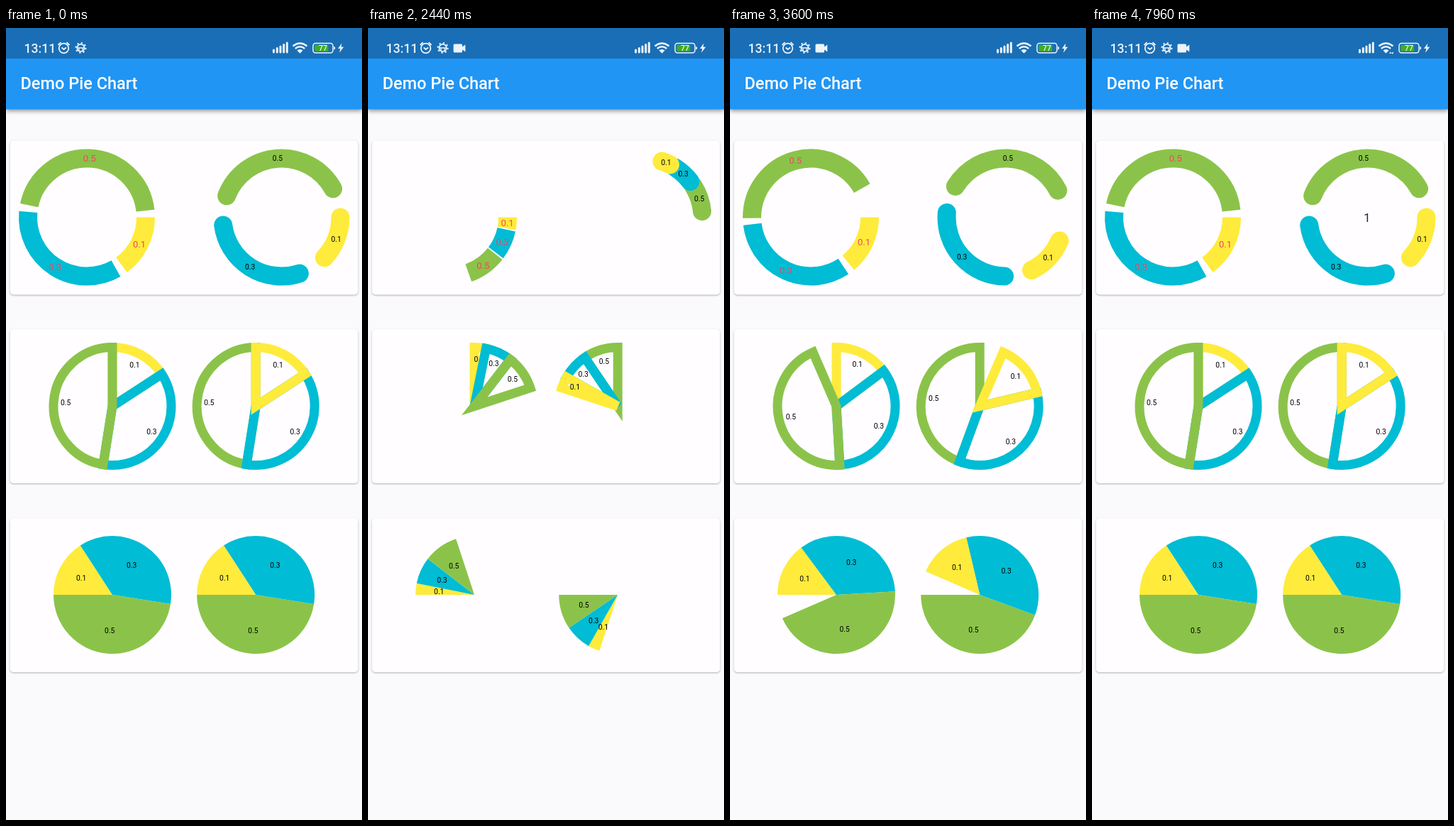
These frames come from a looping animation (502x1115 px, 8000 ms). An HTML page:

```html
<!DOCTYPE html>
<html lang="en">
<head>
<meta charset="utf-8">
<title>Demo Pie Chart</title>
<style>
  html, body { margin: 0; width: 100%; height: 100%; overflow: hidden; background: #faf9fc; }
  svg { display: block; width: 502px; height: 1115px; }
  text { font-family: Roboto, sans-serif; }
  .card { fill: #fffdff; filter: drop-shadow(0 1.2px 1.2px rgba(0, 0, 0, .3)); }
  .bar { fill: #2095f4; filter: drop-shadow(0 2px 3px rgba(0, 0, 0, .45)); }
  .icon { fill: none; stroke: #edf4fb; stroke-width: 1.8; }
  .solid { fill: #edf4fb; }
</style>
</head>
<body>
<svg viewBox="0 0 502 1115">
  <rect width="502" height="1115" fill="#faf9fc"/>
  <rect class="bar" width="502" height="114.5"/>
  <rect width="502" height="43" fill="#196eb6"/>

  <text x="25.5" y="35" font-size="17.6" font-weight="500" class="solid">13:11</text>
  <g class="icon">
    <circle cx="81.5" cy="28.5" r="6.8"/>
    <path d="M78.5 27.5l3 2.5 3.5-2.5M73.5 24l4-3.8M89.500 24l-4-3.8"/>
    <circle cx="105.500" cy="28" r="5.2"/>
    <circle cx="105.500" cy="28" r="7" stroke-width="2" stroke-dasharray="2.2 3.3"/>
    <path d="M100 28h11M103 28v4M108 28v4" stroke-width="1.3"/>
  </g>
  <path id="camera" class="solid" d="M122 22.500h9.500q1.500 0 1.500 1.500v2.500l4.300-3v10l-4.300-3v2.500q0 1.500-1.500 1.500h-9.500q-1.500 0-1.500-1.500v-9q0-1.500 1.500-1.500z"/>
  <path d="M377.500 35v-3M382.300 35v-5.500M387 35v-8M391.700 35v-10.500M396.300 35v-13" stroke="#edf4fb" stroke-width="3" stroke-linecap="round" fill="none" transform="translate(0 -1)"/>
  <g class="icon" stroke-width="2.3" style="stroke-width:2.4">
    <path d="M404.500 25.500q10-8 20 0M407.800 29q6.700-5.400 13.400 0"/>
    <path class="solid" stroke="none" d="M410.300 31.400q4.200-3 8.400 0l-4.200 4.300z"/>
  </g>
  <path id="arrows" class="solid" d="M419.200 36l1.600-2.600 1.600 2.600zM422.200 34.300h3.200l-1.600 2.700z"/>
  <rect x="433" y="21.500" width="28" height="13.500" rx="3.500" class="icon" style="stroke-width:1.5"/>
  <rect x="435.300" y="23.800" width="19" height="9" rx="1.500" fill="#42ad20"/>
  <path class="solid" d="M462.300 26q2 0 2 2.200t-2 2.200zM473.500 21.500l-5.500 7.500h3.400l-1.300 5.800 6.200-8h-3.700z"/>
  <text x="447" y="32" font-size="10.500" font-weight="500" text-anchor="middle" class="solid">77</text>

  <text x="20.500" y="86.300" font-size="23.500" font-weight="500" fill="#fff">Demo Pie Chart</text>

  <rect class="card" x="5.500" y="158.500" width="491" height="217" rx="5"/>
  <rect class="card" x="5.500" y="424" width="491" height="217" rx="5"/>
  <rect class="card" x="5.500" y="690" width="491" height="217" rx="5"/>
  <path id="seams" d="M18 267h26M184 267h26M292 267h26M67 798.500h84M269 798.500h83" stroke="#8bc34a" stroke-opacity=".42"/>
  <g id="charts"></g>
  <text id="pick" x="388" y="272.700" font-size="16.500" text-anchor="middle" fill="#222"></text>
</svg>
<script>
const LOOP = 8000, R = 83;
const SLICES = [
  { label: '0.1', color: '#ffeb3b', sweep: 57 },
  { label: '0.3', color: '#00bcd4', sweep: 132 },
  { label: '0.5', color: '#8bc34a', sweep: 171 }
];
const CHARTS = [
  { x: 114, y: 266.5, from: 0, kind: 'ring', gap: 6.5, text: 13, ink: '#ee4760' },
  { x: 388.5, y: 266.5, from: 0, kind: 'ring', gap: 29, cap: 'round', back: true },
  { x: 150, y: 532.5, from: -90, kind: 'outline', labelR: 66 },
  { x: 352.2, y: 532.5, from: -90, kind: 'outline', labelR: 66, back: true },
  { x: 150, y: 798, from: 180, kind: 'pie', labelR: 50 },
  { x: 352.2, y: 798, from: 180, kind: 'pie', labelR: 50, back: true }
];
const STROKE = { ring: 26, outline: 13, pie: 0 };
const $ = id => document.getElementById(id);

function add(parent, tag, attrs) {
  const el = document.createElementNS('http://www.w3.org/2000/svg', tag);
  for (const k in attrs) el.setAttribute(k, attrs[k]);
  return parent.appendChild(el);
}

function polar(c, r, deg) {
  const a = deg * Math.PI / 180;
  return [c.x + r * Math.cos(a), c.y + r * Math.sin(a)];
}

function build(c) {
  const gap = c.gap || 0, size = c.text || 10.3;
  const scale = 1 - gap * SLICES.length / 360;
  let at = 0;
  const parts = SLICES.map(s => {
    const part = { ...s, start: at, sweep: s.sweep * scale };
    at += part.sweep + gap;
    return part;
  });
  if (c.back) parts.reverse();
  for (const s of parts) {
    const w = STROKE[c.kind];
    s.path = add($('charts'), 'path', {
      fill: w ? 'none' : s.color, stroke: w ? s.color : 'none',
      'stroke-width': w, 'stroke-linecap': c.cap || 'butt'
    });
    s.text = add($('charts'), 'text', {
      'font-size': size, 'text-anchor': 'middle', dy: size * 0.355, fill: c.ink || '#000'
    });
    s.text.textContent = s.label;
  }
  c.parts = parts;
}

function pose(c, p) {
  for (const s of c.parts) {
    const a = c.from + p * (c.back ? s.start - 360 : s.start);
    const sweep = Math.max(s.sweep * p, 0.01);
    const arc = `${polar(c, R, a)} A${R} ${R} 0 0 1 ${polar(c, R, a + sweep)}`;
    s.path.setAttribute('d', c.kind === 'ring' ? 'M' + arc : `M${c.x},${c.y} L${arc} Z`);
    const [x, y] = polar(c, c.labelR || R, a + sweep / 2);
    s.text.setAttribute('x', x);
    s.text.setAttribute('y', y);
  }
}

// cubic-bezier(.3, .22, .5, 1)
function ease(t) {
  if (t <= 0) return 0;
  if (t >= 1) return 1;
  const bez = (a, b, s) => 3 * a * s * (1 - s) ** 2 + 3 * b * s * s * (1 - s) + s ** 3;
  let lo = 0, hi = 1;
  for (let i = 0; i < 30; i++) {
    const mid = (lo + hi) / 2;
    if (bez(0.3, 0.5, mid) < t) lo = mid; else hi = mid;
  }
  return bez(0.22, 1, lo);
}

// Charts fold away, then open again.
const progress = t => t < 2080 ? ease((2060 - t) / 2020) : ease((t - 2085) / 1990);

const show = (id, on) => $(id).setAttribute('visibility', on ? 'visible' : 'hidden');

function draw(t) {
  const p = progress(t);
  CHARTS.forEach(c => pose(c, p));
  show('seams', p < 0.01);
  show('camera', t >= 600);
  show('arrows', t >= 4240);
  $('pick').textContent = t < 4240 ? '' : t < 6200 ? '2' : '1';
}

CHARTS.forEach(build);
const begin = performance.now();
function tick() {
  draw((performance.now() - begin) % LOOP);
  requestAnimationFrame(tick);
}
draw(0);
requestAnimationFrame(tick);
</script>
</body>
</html>
```
